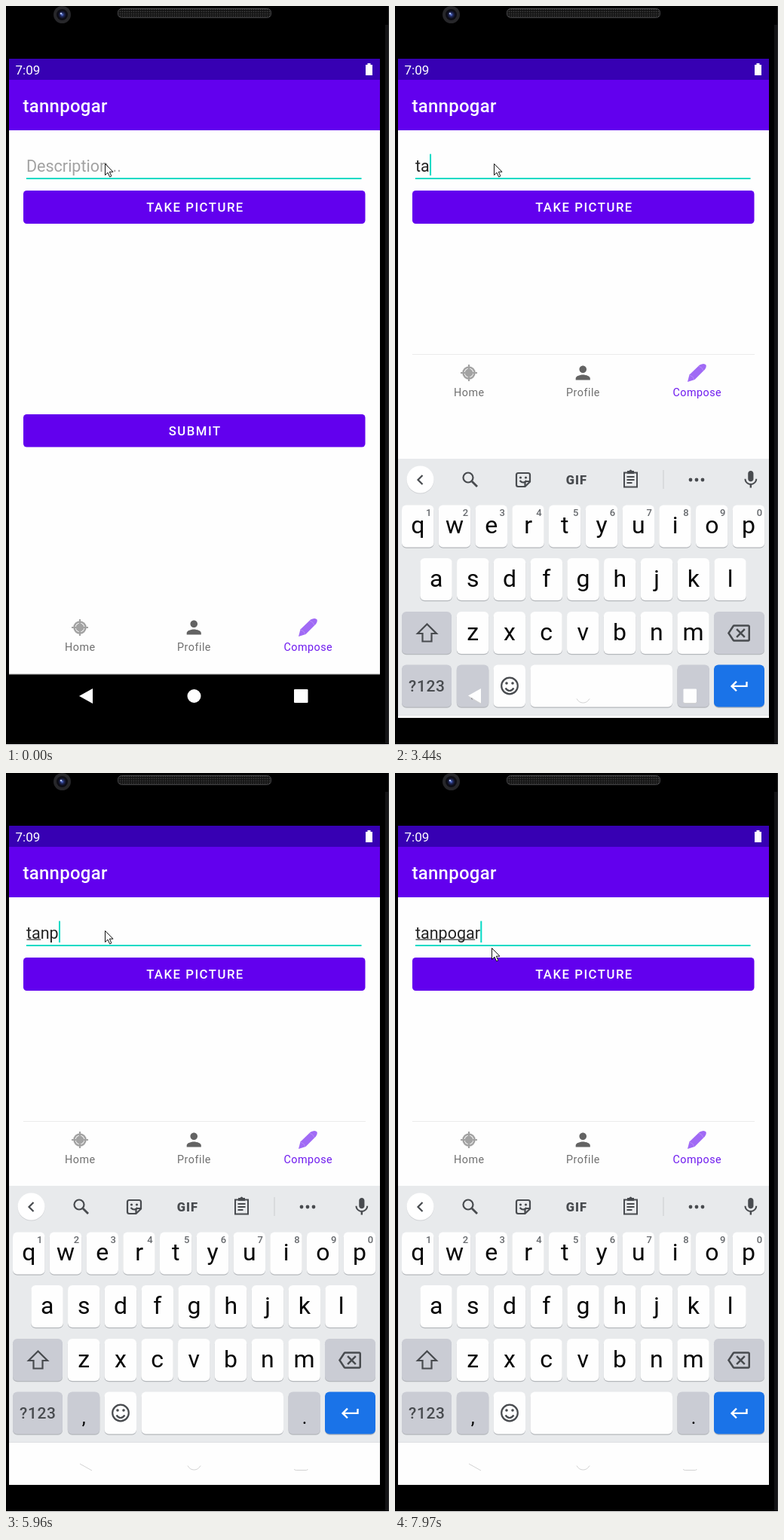
Recreate the animation shown at these times as an HTML page. Size 508 px wide and 981 px high, loop 8000 ms.

```html
<!DOCTYPE html>
<html lang="en">
<head>
<meta charset="utf-8">
<title>Compose screen</title>
<style>
  html, body { margin: 0; width: 100%; height: 100%; overflow: hidden; background: #fff; }
  svg { display: block; width: 508px; height: 981px; font-family: Roboto, sans-serif; }
  .title { font-size: 23.9px; font-weight: 500; letter-spacing: .0125em; fill: #fff; }
  .button { font-size: 16.75px; font-weight: 500; letter-spacing: .0893em; fill: #fff; text-anchor: middle; }
  .field { font-size: 21.5px; }
  .tab { font-size: 14.35px; letter-spacing: .0333em; text-anchor: middle; }
  .key { font-size: 32px; text-anchor: middle; fill: #080808; }
  .digit { font-size: 13px; font-weight: 500; text-anchor: middle; fill: #66696d; }
  .line { fill: none; stroke: #484b4f; stroke-width: 2.2; }
</style>
</head>
<body>
<svg viewBox="0 0 508 981">
  <defs>
    <pattern id="mesh" width="3" height="3" patternUnits="userSpaceOnUse">
      <rect width="3" height="3" fill="#151515"/><circle cx="1.5" cy="1.5" r=".8" fill="#444"/>
    </pattern>
    <radialGradient id="lens">
      <stop offset="0" stop-color="#5a78d8"/><stop offset=".45" stop-color="#20285c"/><stop offset="1" stop-color="#0b0b14"/>
    </radialGradient>
    <clipPath id="screen"><rect x="4" y="70" width="492" height="875"/></clipPath>
  </defs>

  <!-- Phone body -->
  <rect width="508" height="980" fill="#000"/>
  <path d="M503 25h4V980h-4z" fill="#141416"/>
  <path d="M507.5 0V980" stroke="#2a2a2c"/>
  <circle cx="74.500" cy="11.500" r="11.500" fill="#27272a"/>
  <circle cx="74.500" cy="11.500" r="7.500" fill="#0d0d14"/>
  <circle cx="74.500" cy="11.500" r="5.500" fill="url(#lens)"/>
  <circle cx="73" cy="10" r="1.300" fill="#b4c4f4"/>
  <rect x="148.500" y="3.500" width="203" height="12" rx="5" fill="url(#mesh)" stroke="#48484a"/>

  <!-- App -->
  <rect x="4" y="165" width="492" height="722" fill="#fefefe"/>
  <rect x="4" y="70" width="492" height="28" fill="#3700b3"/>
  <rect x="4" y="98" width="492" height="67" fill="#6200ee"/>
  <text x="12.500" y="91" font-size="17" fill="#fff">7:09</text>
  <path d="M477 78h2.500v-2h4v2h2.500v14h-9z" fill="#fff"/>
  <text class="title" x="22.500" y="141">tannpogar</text>
  <rect x="27" y="228" width="444.500" height="2" fill="#03dac5"/>
  <rect x="23" y="245" width="453.500" height="44" rx="4.500" fill="#6200ee"/>
  <text class="button" x="251" y="273">TAKE PICTURE</text>
  <g id="submit">
    <rect x="23" y="542" width="453.500" height="43.500" rx="4.500" fill="#6200ee"/>
    <text class="button" x="250.700" y="570">SUBMIT</text>
  </g>
  <text id="hint" class="field" x="27" y="219.500" fill="#a2a2a2">Description...</text>
  <text id="typed" class="field" x="27" y="219.500" fill="#242424"></text>
  <rect id="underline" x="27.500" y="220.500" height="1.300" fill="#3c3c3c"/>
  <rect id="caret" y="196.500" width="2" height="28.500" fill="#03dac5"/>

  <g id="tabs">
    <g fill="#a3a3a3" stroke="#a3a3a3">
      <circle cx="98" cy="825" r="7.500" fill="none" stroke-width="2.500"/>
      <circle cx="98" cy="825" r="5"/>
      <path d="M98 814v22M87 825h22" fill="none" stroke-width="2.200"/>
    </g>
    <path transform="translate(234.900 810.700) scale(1.196)" fill="#636363"
      d="M12 12c2.210 0 4-1.790 4-4s-1.790-4-4-4-4 1.790-4 4 1.790 4 4 4zm0 2c-2.670 0-8 1.340-8 4v2h16v-2c0-2.660-5.330-4-8-4z"/>
    <path d="M388 837L390.500 827.500 404 814.500Q410 811.500 412.500 814.500 413.500 817 411 820.500L397.500 834Z" fill="#a06af5"/>
    <path d="M390.500 828q5 1 6.500 6M403 816q5 2 6 6" fill="none" stroke="#b58cf7"/>
    <text class="tab" x="98.300" y="856" fill="#707070">Home</text>
    <text class="tab" x="249.500" y="856" fill="#707070">Profile</text>
    <text class="tab" x="400.800" y="856" fill="#6f1bef">Compose</text>
  </g>

  <g id="darkNav" fill="#fff">
    <rect x="4" y="886.500" width="492" height="1" fill="#aaa"/>
    <path d="M97 916l18-10v20z"/><circle cx="249.500" cy="916" r="9"/><rect x="382" y="907" width="18.500" height="18" rx="1"/>
  </g>

  <g id="typing" clip-path="url(#screen)">
    <path d="M23 462.500H477" stroke="#ebebeb"/>
    <rect x="4" y="548" width="492" height="397" fill="#fefefe"/>
    <g id="keyboard">
      <rect x="4" y="548" width="492" height="341" fill="#e8eaec"/>
      <path d="M4 888.500H496" stroke="#dfe1e3"/>
      <g id="keys"></g>
      <circle cx="33.500" cy="576.500" r="18" fill="#cfd1d4"/>
      <circle cx="33.500" cy="575.500" r="18" fill="#fff"/>
      <g class="line">
        <path d="M36.500 570l-6 6 6 6"/>
        <circle cx="97" cy="573" r="6.500"/><path d="M102 578l7 7" stroke-width="2.800"/>
        <path d="M163.500 567h13q2.500 0 2.500 2.500v9l-6.500 6.500h-9q-2.500 0-2.500-2.500v-13q0-2.500 2.500-2.500zM179 578h-4q-2.500 0-2.500 2.500v4M165.500 577q4.500 5 9 0"/>
        <path d="M304 566.500h17v19h-17zM307.500 572h10M307.500 576h10M307.500 580h7" stroke-width="2"/>
        <path d="M42.500 767.500L55 780h-6.500v10.500h-12V780H30z"/>
        <circle cx="152" cy="849.500" r="10.800"/><path d="M146.500 852.500q5.500 7 11 0"/>
      </g>
      <g fill="#484b4f">
        <circle cx="166.500" cy="573" r="1.600"/><circle cx="173.500" cy="573" r="1.600"/>
        <path d="M308 564h2.500q2-3 4 0h2.500v4h-9z"/>
        <circle cx="392" cy="576" r="2.400"/><circle cx="400" cy="576" r="2.400"/><circle cx="408" cy="576" r="2.400"/>
        <circle cx="148" cy="846" r="1.800"/><circle cx="156" cy="846" r="1.800"/>
        <text x="240.800" y="581.500" text-anchor="middle" font-size="16.500" font-weight="900" letter-spacing="1">GIF</text>
        <text x="42.300" y="857" text-anchor="middle" font-size="21" font-weight="500" letter-spacing=".6">?123</text>
        <path transform="translate(457.500 561.500) scale(1.196)" d="M12 14c1.660 0 3-1.340 3-3V5c0-1.660-1.340-3-3-3S9 3.340 9 5v6c0 1.660 1.340 3 3 3zm5.300-3c0 3-2.540 5.100-5.300 5.100S6.700 14 6.700 11H5c0 3.410 2.720 6.230 6 6.720V21h2v-3.280c3.280-.480 6-3.300 6-6.720z"/>
        <path transform="translate(441 764.500) scale(1.250)" d="M22 3H7c-.690 0-1.230.350-1.590.880L0 12l5.410 8.110c.360.530.900.890 1.590.890h15c1.100 0 2-.900 2-2V5c0-1.100-.900-2-2-2zm0 16H7.070L2.400 12l4.660-7H22zm-11.590-2L14 13.410 17.590 17 19 15.590 15.410 12 19 8.410 17.590 7 14 10.590 10.410 7 9 8.410 12.590 12 9 15.590z"/>
      </g>
      <path d="M356 563v25" stroke="#cfd1d4" stroke-width="1.200"/>
      <path transform="translate(442.500 835.500) scale(1.200)" fill="#fff" d="M19 7v4H5.830l3.580-3.590L8 6l-6 6 6 6 1.410-1.410L5.830 13H21V7z"/>
      <text x="103.300" y="864" font-size="25" text-anchor="middle">,</text>
      <text x="396" y="864" font-size="25" text-anchor="middle">.</text>
    </g>
    <g fill="#fefefe">
      <path d="M97 915.500l17-9.500v20z"/><circle cx="249.500" cy="915.500" r="9"/><rect x="382.500" y="906.500" width="17.500" height="18.500" rx="1"/>
      <path d="M98 917l16 9M241 919.500q3 5.500 8.500 5.500t8.500-5.500M382.500 924q0 1.500 2 1.500h14q1.500 0 1.500-1.500" fill="none" stroke="#d2d2d2"/>
    </g>
  </g>

  <path id="pointer" d="M.5.5v15l3.500-3.300 2.600 5.600 2.300-1-2.600-5.600h4.700z" fill="#fff" stroke="#111"/>
</svg>
<script>
const $ = id => document.getElementById(id);
const PITCH = 48.75, LOOP = 8000, WORD = 'tanpogar';

function add(tag, attributes, text = '') {
  const node = document.createElementNS('http://www.w3.org/2000/svg', tag);
  for (const name in attributes) node.setAttribute(name, attributes[name]);
  node.textContent = text;
  $('keys').append(node);
}

function key(x, y, width, fill = '#fefefe') {
  const box = { x, width, height: 56, rx: 6 };
  add('rect', { ...box, y: y + 1.2, fill: '#b5b8bc' });
  add('rect', { ...box, y, fill });
}

function letters(row, left, top) {
  [...row].forEach((letter, i) => {
    const x = left + i * PITCH;
    key(x, top, 42.5);
    add('text', { class: 'key', x: x + 21.3, y: top + 37.5 }, letter);
    if (top < 650) add('text', { class: 'digit', x: x + 35.7, y: top + 14 }, (i + 1) % 10);
  });
}

const GREY = '#caccd4';
letters('qwertyuiop', 9, 609.5);
letters('asdfghjkl', 33.3, 680);
letters('zxcvbnm', 81.8, 751);
key(9, 751, 66, GREY);
key(423, 751, 67, GREY);
key(9, 821.5, 66, GREY);
key(81.8, 821.5, 42.5, GREY);
key(130.5, 821.5, 42.5);
key(179.5, 821.5, 188.5);
key(374.5, 821.5, 42.5, GREY);
key(423, 821.5, 67, '#1a73e8');

// Each step: start in ms, letters typed, letters underlined, caret visible
const steps = [
  [0, 0, 0, 0], [590, 0, 0, 1], [1440, 0, 0, 0], [2110, 0, 0, 1],
  [3440, 2, 0, 1], [4570, 2, 0, 0], [4900, 4, 0, 1],
  [5960, 4, 2, 1], [6090, 4, 4, 1], [6500, 5, 4, 1], [6800, 6, 5, 1],
  [7130, 7, 5, 1], [7390, 7, 6, 1], [7680, 8, 6, 1], [7810, 8, 7, 1]
];
const pointerSteps = [[0, 131, 209], [7810, 128, 223], [7970, 128, 232]];
const current = (list, time) => list.findLast(step => step[0] <= time);
const show = (id, visible) => $(id).style.display = visible ? '' : 'none';
const move = (id, x, y) => $(id).setAttribute('transform', `translate(${x} ${y})`);

function draw(time) {
  const [, typed, underlined, caret] = current(steps, time);
  const [, x, y] = current(pointerSteps, time);
  const open = time >= 3440;
  const field = $('typed');
  field.textContent = WORD.slice(0, typed);
  const widthOf = count => count ? field.getSubStringLength(0, count) : 0;
  $('underline').setAttribute('width', widthOf(underlined));
  $('caret').setAttribute('x', 27.3 + widthOf(typed));
  show('caret', caret);
  show('hint', !typed);
  show('submit', !open);
  show('darkNav', !open);
  show('typing', open);
  move('tabs', 0, open ? -338 : 0);
  move('keyboard', 0, time < 3570 ? 53 : 0);
  move('pointer', x, y);
  // The tabs stay above the closed keyboard area and below the open one
  $('typing').before($('tabs'));
}

function frame() {
  draw(performance.now() % LOOP);
  requestAnimationFrame(frame);
}
frame();
</script>
</body>
</html>
```
